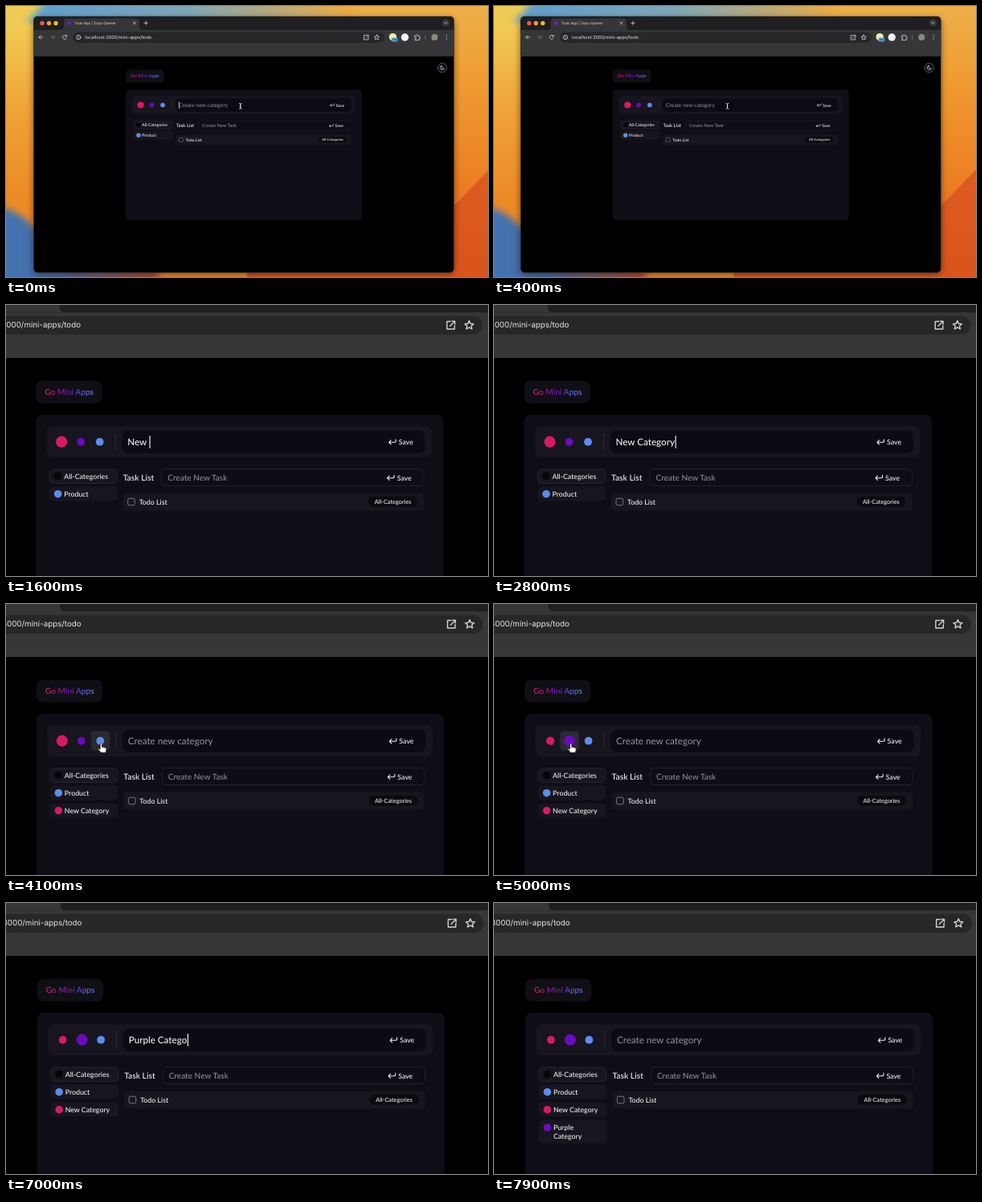
Animation of 600x338 px, one loop 8 s. Source, as an HTML page:

```html
<!DOCTYPE html>
<html lang="en">
<head>
<meta charset="utf-8">
<title>Todo App</title>
<style>
  html, body { margin: 0; width: 100%; height: 100%; overflow: hidden; background: #000; }
  svg { display: block; width: 100vw; height: 100vh; }
  text { font-family: Lato, "Open Sans", sans-serif; font-size: 8.8px; font-weight: 500; fill: #f1f1f3;
         white-space: pre; text-rendering: geometricPrecision; }
  .chrome text { font-family: Inter, Roboto, sans-serif; font-weight: 400; fill: #e6e6e8; }
  .line { fill: none; stroke: #d4d4d6; stroke-width: .8; stroke-linecap: round; stroke-linejoin: round; }
  .dim { stroke: #77777a; }
  .row { fill: #17151d; }
  .hint { font-weight: 400; fill: #96959f; }
  .pink { fill: #d81b60; }
  .purple { fill: #6a0bc0; }
  .blue { fill: #5b8def; }
  .pointer { fill: #fff; stroke: #111; stroke-width: .8; stroke-linejoin: round; }
</style>
</head>
<body>
<svg viewBox="0 0 600 338" preserveAspectRatio="none">
  <defs>
    <linearGradient id="brand">
      <stop offset="0" stop-color="#e01d58"/>
      <stop offset=".5" stop-color="#6f14c8"/>
      <stop offset="1" stop-color="#5b8def"/>
    </linearGradient>
    <linearGradient id="leftPetal" x2="0" y2="1">
      <stop offset=".08" stop-color="#f0cb55"/>
      <stop offset=".35" stop-color="#f0a63a"/>
      <stop offset=".7" stop-color="#ec8a26"/>
    </linearGradient>
    <linearGradient id="rightPetal" x2="0" y2="1">
      <stop offset="0" stop-color="#edb04a"/>
      <stop offset=".3" stop-color="#ef9a30"/>
      <stop offset=".7" stop-color="#ec7a22"/>
    </linearGradient>
    <linearGradient id="deep" x2="0" y2="1">
      <stop offset="0" stop-color="#de5c20"/>
      <stop offset="1" stop-color="#d9541c"/>
    </linearGradient>
    <linearGradient id="sky">
      <stop offset="0" stop-color="#5d9fd0"/>
      <stop offset=".5" stop-color="#7fa6b8"/>
      <stop offset="1" stop-color="#ecaa44"/>
    </linearGradient>
    <linearGradient id="dusk">
      <stop offset="0" stop-color="#3f78b8"/>
      <stop offset=".4" stop-color="#4a68a0"/>
      <stop offset="1" stop-color="#b4482a"/>
    </linearGradient>
    <filter id="soft" x="-10%" y="-10%" width="120%" height="120%"><feGaussianBlur stdDeviation="4"/></filter>
    <g id="enter">
      <path class="line" style="stroke:#f1f1f3;stroke-width:1.1" d="M9 -2.8V-.8Q9 .8 7.4 .8H.6M3 -1.8L.5 .8L3 3.4"/>
      <text x="12.5" y="3.8">Save</text>
    </g>
  </defs>

  <g id="camera">
    <g class="chrome" transform="translate(-219.7 -42.5) scale(1.726)">
      <!-- wallpaper -->
      <rect x="-5" y="-5" width="305" height="350" fill="url(#leftPetal)"/>
      <rect x="299" y="-5" width="310" height="350" fill="url(#rightPetal)"/>
      <path fill="url(#sky)" filter="url(#soft)" d="M55 -15H430V20H24Q40 8 55 -15Z"/>
      <path fill="url(#deep)" d="M607 198L545 262L300 300V345H607Z"/>
      <path fill="url(#dusk)" filter="url(#soft)" d="M-20 250Q15 250 40 282L190 325V355H-20Z"/>

      <!-- browser window -->
      <rect x="34.5" y="16" width="523" height="318" rx="6" opacity=".55" filter="url(#soft)"/>
      <rect x="34.5" y="13" width="523" height="319.5" rx="5" stroke="#3c3c3e" stroke-width=".5"/>
      <path fill="#1f1f21" d="M34.5 31V18Q34.5 13 39.5 13H552.5Q557.5 13 557.5 18V31Z"/>
      <rect x="34.5" y="30" width="523" height="32.9" fill="#363638"/>
      <path fill="#363638" d="M68 30Q72 30 72 26V19Q72 15.5 75.5 15.5H162.5Q166 15.5 166 19V26Q166 30 170 30Z"/>
      <circle cx="45" cy="21.5" r="2.7" fill="#f4574e"/>
      <circle cx="53.5" cy="21.5" r="2.7" fill="#f0a034"/>
      <circle cx="62" cy="21.5" r="2.7" fill="#e8bc3c"/>
      <circle cx="78.5" cy="21.3" r="2.5" fill="#6a1fb5"/>
      <text x="85" y="22.9" style="font-size:4.45px">Todo App | Zopu Opener</text>
      <path class="line" d="M158.3 19.8l3 3m0-3l-3 3M172 21.3h4.4m-2.2-2.2v4.4"/>
      <circle cx="547.5" cy="21" r="4.5" fill="#39393b"/>
      <path class="line" d="M545.7 20.3l1.8 1.7l1.8-1.7"/>

      <!-- toolbar -->
      <path class="line" d="M46 39h-5m2.2-2.2l-2.2 2.2l2.2 2.2M75.2 37.7a2.5 2.5 0 1 0 .2 2.2M75.4 36.3v1.7h-1.7"/>
      <path class="line dim" d="M55.5 39h5m-2.2-2.2l2.2 2.2l-2.2 2.2"/>
      <rect x="83.5" y="32.5" width="387.5" height="13.6" rx="6.8" fill="#272729"/>
      <circle class="line" cx="90.2" cy="39.1" r="2.7"/>
      <path class="line" d="M90.2 38.9v1.5M90.2 37.6v.05"/>
      <text x="98.3" y="41.1" style="font-size:5.68px">localhost:3000/mini-apps/todo</text>
      <path class="line" d="M448 36.5h-2.5v5.5h5.5v-2.5M449 36.3h2.2v2.2M451 36.5l-3.3 3.3"/>
      <path class="line" d="M461.5 36l.9 2.1l2.3 .2l-1.7 1.5l.5 2.2l-2-1.2l-2 1.2l.5-2.2l-1.7-1.5l2.3-.2z"/>
      <circle cx="481.5" cy="38.7" r="4.7" fill="#f0e7b0"/>
      <rect x="480" y="39.8" width="7.5" height="4.6" rx="1" fill="#4d9fd6"/>
      <text x="481.2" y="43.4" style="font-size:3.3px;fill:#123">10s</text>
      <circle cx="496.5" cy="39" r="4.7" fill="#f4f4f4"/>
      <path class="line" d="M509 37.2h1.7a1 1 0 1 1 1.9 0h1.7v1.9a1 1 0 1 1 0 1.9v1.6h-5.3v-1.7a1 1 0 1 0 0-1.9z"/>
      <path class="line dim" d="M522 36.5v5.5"/>
      <circle cx="533.5" cy="39" r="4" fill="#8f8878"/>
      <path class="line" style="stroke-width:1.2" d="M548.3 36.7v.01M548.3 39v.01M548.3 41.3v.01"/>

      <!-- theme switch -->
      <circle cx="543" cy="77" r="5.7" fill="#0c0b10" stroke="#85858a" stroke-width=".6"/>
      <path class="line" d="M542.5 74.5a2.6 2.6 0 1 0 3 3.3a2.3 2.3 0 0 1-3-3.3z"/>
    </g>

    <rect x="37.5" y="94.5" width="82.5" height="28" rx="8" fill="#100f15"/>
    <text x="48.5" y="112" style="font-size:10.2px;fill:url(#brand)">Go Mini Apps</text>
    <rect x="37.5" y="137" width="507.5" height="282" rx="8" fill="#0f0d16"/>

    <!-- new category bar -->
    <rect class="row" x="51" y="151" width="479.5" height="39" rx="8"/>
    <rect id="hover" y="158.5" width="23.5" height="24" rx="4" fill="#2b2931"/>
    <circle id="pinkDot" class="pink" cx="69.5" cy="170.7"/>
    <circle id="purpleDot" class="purple" cx="93.5" cy="170.7"/>
    <circle class="blue" cx="117" cy="170.7" r="4.9"/>
    <path d="M136.5 160v21" stroke="#302d38"/>
    <rect x="144.5" y="156.5" width="377.5" height="28.5" rx="8" fill="#0c0a12"/>
    <text id="field" x="151.5" y="174.8" style="font-size:11.65px"></text>
    <rect id="caret" y="163" width="1.1" height="15.7" fill="#fff"/>
    <use href="#enter" x="476.5" y="170.5"/>

    <!-- categories -->
    <rect class="row" x="54.5" y="205" width="84" height="17.5" rx="5" stroke="#2c2a33" stroke-width=".8"/>
    <circle cx="65" cy="213.5" r="4.8" fill="#060508"/>
    <text x="72.5" y="216.6">All-Categories</text>
    <rect class="row" x="54" y="226.5" width="85" height="18" rx="5"/>
    <circle class="blue" cx="65" cy="235.7" r="4.8"/>
    <text x="72.5" y="238.7">Product</text>
    <g id="firstNew">
      <rect class="row" x="54" y="248.5" width="85" height="18" rx="5"/>
      <circle class="pink" cx="65" cy="257.7" r="4.8"/>
      <text x="72.5" y="260.7">New Category</text>
    </g>
    <g id="secondNew">
      <rect class="row" x="54" y="270.5" width="85" height="29.5" rx="5"/>
      <circle class="purple" cx="65" cy="280" r="4.8"/>
      <text x="72.5" y="283">Purple</text>
      <text x="72.5" y="294.2">Category</text>
    </g>

    <!-- tasks -->
    <text x="146" y="218.6" style="font-size:10.3px">Task List</text>
    <rect x="194" y="204.7" width="326.5" height="20.8" rx="5" fill="#0e0c14" stroke="#292630" stroke-width=".8"/>
    <text class="hint" x="201.5" y="218.6" style="font-size:10.1px">Create New Task</text>
    <use href="#enter" x="474.5" y="215"/>
    <rect class="row" x="146" y="234.5" width="374.5" height="22" rx="5"/>
    <rect x="152" y="241.2" width="8.6" height="8.6" rx="2" fill="none" stroke="#85848a" stroke-width=".9"/>
    <text x="166" y="248.6">Todo List</text>
    <rect x="451.5" y="239" width="61" height="12.5" rx="6.2" fill="#0b0a0f"/>
    <text x="459" y="247.9" style="font-size:7.35px">All-Categories</text>

    <!-- pointer shapes, hot spot at 0,0 -->
    <g id="pointer">
      <path id="arrow" class="pointer" d="M0 0V11L2.6 8.7L4.3 12.5L6.1 11.7L4.4 8H8Z"/>
      <path id="hand" class="pointer" d="M-1.2 1Q0 -.8 1.2 1V4.5Q2.5 3.6 3.3 4.9Q4.6 4.2 5.2 5.5Q6.7 5.2 6.7 6.8Q6.8 9 5.5 11.5H-.3Q-1.5 9.3 -3.7 7.3Q-3.8 5.6 -1.2 7Z"/>
      <g id="beam" fill="none" stroke-linecap="round">
        <path stroke="#000" stroke-width="2.6" d="M-2.5 -6Q0 -6 0 -4V4Q0 6 -2.5 6M2.5 -6Q0 -6 0 -4V4Q0 6 2.5 6"/>
        <path stroke="#fff" stroke-width="1.3" d="M-2.5 -6Q0 -6 0 -4V4Q0 6 -2.5 6M2.5 -6Q0 -6 0 -4V4Q0 6 2.5 6"/>
      </g>
    </g>
  </g>
</svg>
<script>
const LOOP = 8000;
const KEY_GAP = 105;
const ENTRIES = [
  { text: 'New Category', start: 1200, save: 3100 },
  { text: 'Purple Category', start: 5740, save: 7500 },
];
const PICK_PURPLE = 4900;
const PATH = [[3650, 235, 318], [4000, 118, 174], [4450, 118, 174], [4700, 95, 174], [5050, 95, 174], [5400, 215, 172]];

const el = id => document.getElementById(id);
const [camera, hover, pinkDot, purpleDot, field, caret, firstNew, secondNew, pointer, arrow, hand, beam] =
  ['camera', 'hover', 'pinkDot', 'purpleDot', 'field', 'caret', 'firstNew', 'secondNew', 'pointer', 'arrow', 'hand', 'beam'].map(el);

const lerp = (a, b, p) => a + (b - a) * p;
const ramp = (t, from, to) => Math.min(1, Math.max(0, (t - from) / (to - from)));
const smooth = p => p * p * (3 - 2 * p);
const show = (node, on) => { node.style.display = on ? '' : 'none'; };

function moveCamera(t) {
  const p = smooth(ramp(t, 680, 920));
  const x = lerp(127.3 - 1.3 * ramp(t, 0, 400), (t - 2800) * 1.4 / 5100, p);
  camera.setAttribute('transform', `translate(${x} ${lerp(24.6, 0, p)}) scale(${lerp(.5794, 1, p)})`);
}

function typeField(t) {
  const entry = ENTRIES.find(e => t >= e.start && t < e.save);
  const typed = entry ? entry.text.slice(0, 1 + Math.floor((t - entry.start) / KEY_GAP)) : '';
  field.textContent = typed || 'Create new category';
  field.setAttribute('class', typed ? '' : 'hint');
  caret.setAttribute('x', 151.3 + (typed ? field.getComputedTextLength() + .8 : 0));
  show(caret, typed || t < 300 || (t > 5420 && t < 5740));
  show(firstNew, t >= ENTRIES[0].save);
  show(secondNew, t >= ENTRIES[1].save);
}

function pointerAt(t) {
  if (t < 680) return [284, 173];
  if (t < PATH[0][0] || t > ENTRIES[1].start) return null;
  const i = PATH.findIndex(k => k[0] > t);
  if (i < 0) return PATH[PATH.length - 1].slice(1);
  const [a, b] = [PATH[i - 1], PATH[i]];
  const p = smooth(ramp(t, a[0], b[0]));
  return [lerp(a[1], b[1], p), lerp(a[2], b[2], p)];
}

function movePointer(t) {
  const spot = pointerAt(t);
  show(pointer, spot);
  const [x, y] = spot || [0, 0];
  const inBar = y > 157 && y < 185;
  const dot = inBar && [69.5, 93.5, 117].find(d => Math.abs(d - x) < 11.7);
  const inField = inBar && x > 144;
  pointer.setAttribute('transform', `translate(${x} ${y})`);
  show(hand, dot);
  show(beam, inField);
  show(arrow, !dot && !inField);
  show(hover, dot);
  if (dot) hover.setAttribute('x', dot - 11.7);
}

function pickColour(t) {
  const p = smooth(ramp(t, PICK_PURPLE, PICK_PURPLE + 130));
  pinkDot.setAttribute('r', lerp(7.1, 4.9, p));
  purpleDot.setAttribute('r', lerp(4.9, 7.1, p));
}

function draw() {
  const t = performance.now() % LOOP;
  moveCamera(t);
  typeField(t);
  movePointer(t);
  pickColour(t);
  requestAnimationFrame(draw);
}
draw();
</script>
</body>
</html>
```
